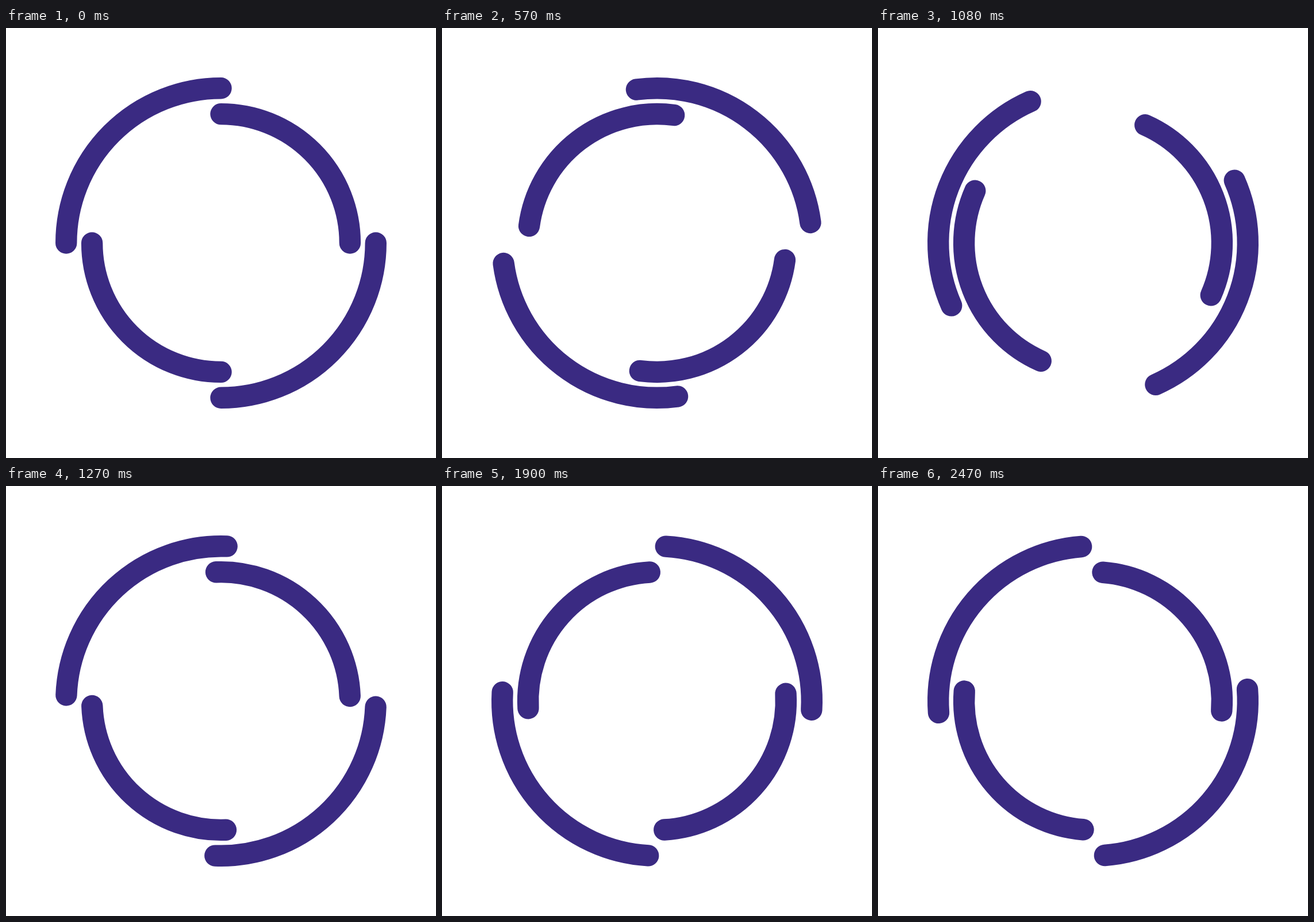
An HTML page with a canvas that plays this animation: 748 by 748 pixels, repeating every 2500 ms.

```html
<!DOCTYPE html>
<html lang="en">
<head>
<meta charset="utf-8">
<title>Double ring spinner</title>
<style>
  html, body { margin: 0; width: 100%; height: 100%; overflow: hidden; background: #fff; }
  canvas { display: block; }
</style>
</head>
<body>
<canvas id="stage" width="748" height="748"></canvas>
<script>
  const ctx = document.getElementById('stage').getContext('2d');
  const SIZE = 748;
  const UNIT = SIZE / 100;
  const LOOP = 2500;
  const STEPS = 83;
  const QUARTER = Math.PI / 2;

  // Steps start on whole hundredths of a second.
  const stepStart = i => Math.round(i * LOOP / STEPS / 10) * 10;

  function stepAt(time) {
    let step = Math.min(STEPS - 1, Math.ceil(time * STEPS / LOOP));
    while (step > 0 && stepStart(step) > time) step--;
    return step;
  }

  // Two opposite quarter arcs.
  function ring(radius, start) {
    for (const angle of [start, start + Math.PI]) {
      ctx.beginPath();
      ctx.arc(SIZE / 2, SIZE / 2, radius * UNIT, angle, angle + QUARTER);
      ctx.stroke();
    }
  }

  function draw(time) {
    const turn = 2 * Math.PI * stepAt(time) / STEPS;
    ctx.fillStyle = '#fff';
    ctx.fillRect(0, 0, SIZE, SIZE);
    ctx.strokeStyle = '#3a2a82';
    ctx.lineWidth = 5 * UNIT;
    ctx.lineCap = 'round';
    ring(36, turn);
    ring(30, -QUARTER - turn);
  }

  function tick() {
    draw(performance.now() % LOOP);
    requestAnimationFrame(tick);
  }
  tick();
</script>
</body>
</html>
```
